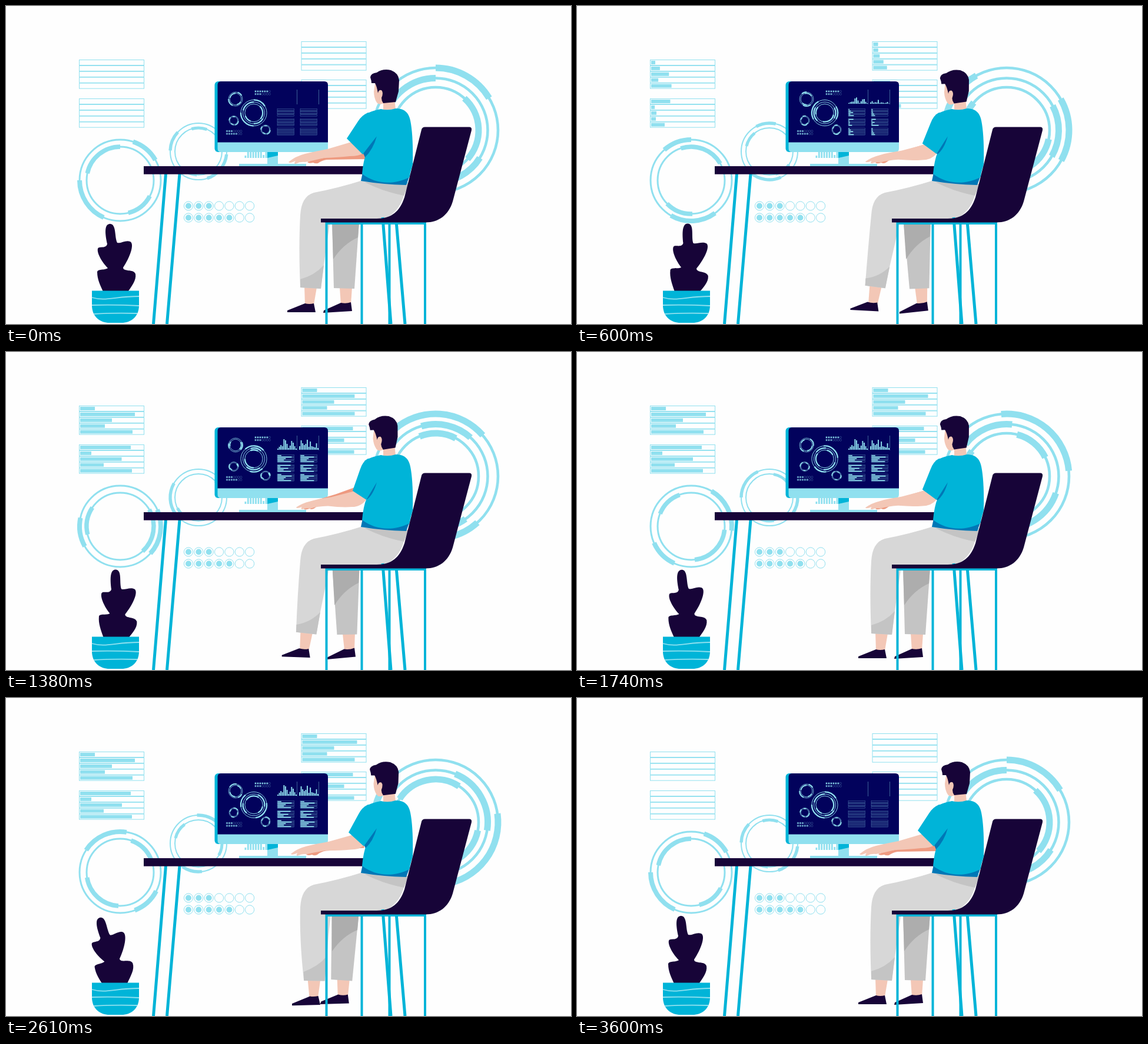
Animation, 960 px wide and 540 px high, one loop 3630 ms. Source, as an HTML page with a canvas:

```html
<!DOCTYPE html>
<html lang="en">
<head>
<meta charset="utf-8">
<title>Man at a desk</title>
<style>
html, body { margin: 0; width: 100%; height: 100%; overflow: hidden; background: #fefefe; }
canvas { display: block; }
</style>
</head>
<body>
<canvas id="stage" width="960" height="540"></canvas>
<script>
const ctx = document.getElementById('stage').getContext('2d');
const CYAN = '#00b4d8', LIGHT = '#90e0ef', DARK = '#170438', NAVY = '#02025c', BLUE = '#0077b6';
const SKIN = '#f3c7b6', SKIN_DARK = '#ee9a80', PANTS = '#d7d7d7', SHADE = '#c4c4c4', DEEP = '#adadad';
const LOOP = 3630, CYCLE = 3600, STEP = 30;
const clamp = v => Math.max(0, Math.min(1, v));

const fill = (path, color) => { ctx.fillStyle = color; ctx.fill(new Path2D(path)); };
const line = (path, color, width) => {
  ctx.strokeStyle = color; ctx.lineWidth = width; ctx.stroke(new Path2D(path));
};
const box = (x, y, w, h, color) => { ctx.fillStyle = color; ctx.fillRect(x, y, w, h); };
function placed(x, y, scale, draw) {
  ctx.save(); ctx.translate(x, y); ctx.scale(scale, scale); draw(); ctx.restore();
}
function turned(x, y, degrees, draw) {
  ctx.save(); ctx.translate(x, y); ctx.rotate(degrees * Math.PI / 180); ctx.translate(-x, -y);
  draw(); ctx.restore();
}

// Blend two paths that share the same commands.
function mix(a, b, p) {
  const to = b.match(/-?[\d.]+/g);
  let i = 0;
  return a.replace(/-?[\d.]+/g, n => (+n + (to[i++] - n) * p).toFixed(2) + ' ');
}

// Smooth periodic curve through the pose values.
const KEYS = [0, 600, 1050, 1740, 2610, 3090];
function pose(values, t) {
  t %= CYCLE;
  const n = KEYS.length;
  const time = i => KEYS[(i + n) % n] + Math.floor(i / n) * CYCLE;
  const value = i => values[(i + n) % n];
  const slope = i => (value(i + 1) - value(i - 1)) / (time(i + 1) - time(i - 1));
  let i = 0;
  while (time(i + 1) <= t) i++;
  const d = time(i + 1) - time(i), u = (t - time(i)) / d, v = 1 - u;
  return v * v * (1 + 2 * u) * value(i) + u * u * (3 - 2 * u) * value(i + 1)
    + d * u * v * (v * slope(i) - u * slope(i + 1));
}

// Each ring: radius, thin width, thick width, direction, then start and length of two arcs.
const BIG = [[106, 4.6, 11, 1, -90, 59, 91, 90], [88.5, 4.6, 11, -1, 32, 58, 193, 77], [73, 4.6, 11, 1, -48, 90, 110, 50]];
const LEFT = [[69, 3, 8, -1, -71.5, 41.5, 114, 66], [57, 3, 7.5, 1, 192, 78, 28, 48]];
const MID = [[48, 2, 5.4, 1, 182, 41, 6, 66], [40, 2, 5, -1, -107, 38, 94, 41]];
function rings(x, y, set, t, scale = 1, bold = 1) {
  placed(x, y, scale, () => {
    ctx.strokeStyle = LIGHT;
    const arc = (r, from, length, width) => {
      ctx.lineWidth = width * bold;
      ctx.beginPath();
      ctx.arc(0, 0, r, from * Math.PI / 180, (from + length) * Math.PI / 180);
      ctx.stroke();
    };
    for (const [r, thin, thick, dir, a, la, b, lb] of set) {
      const turn = dir * t / CYCLE * 360;
      arc(r, 0, 360, thin);
      arc(r, a + turn, la, thick);
      arc(r, b + turn, lb, thick);
    }
  });
}

const grow = (t, start) => clamp((t - start) / 900);
const fade = t => clamp((CYCLE - t) / 600);
const ROWS_A = [25, 93, 54, 42, 89], ROWS_B = [86, 19, 71, 40, 88];
const DELAY_A = [348, 456, 96, 340, 250], DELAY_B = [260, 310, 486, 420, 365];
const DELAY_C = [310, 520, 420, 230, 365], DELAY_D = [303, 310, 340, 420, 120];
function panel(x, y, rows, delays, t, scale = 1) {
  placed(x, y, scale, () => {
    ctx.strokeStyle = LIGHT;
    ctx.lineWidth = 1;
    rows.forEach((w, i) => {
      ctx.strokeRect(0, i * 9.9, 110, 9);
      ctx.globalAlpha = fade(t);
      box(1.5, i * 9.9 + 1.5, w * grow(t, delays[i]), 6, LIGHT);
      ctx.globalAlpha = 1;
    });
  });
}

function dots(x, y, filled, scale = 1) {
  placed(x, y, scale, () => {
    ctx.strokeStyle = ctx.fillStyle = LIGHT;
    ctx.lineWidth = 1;
    const disc = (cx, cy, r) => { ctx.beginPath(); ctx.arc(cx, cy, r, 0, 7); };
    filled.forEach((count, row) => {
      for (let i = 0; i < 7; i++) {
        disc(i * 17.35, row * 20, 7.6); ctx.stroke();
        if (i < count) { disc(i * 17.35, row * 20, 5); ctx.fill(); }
      }
    });
  });
}

function chart(x, heights, start, t) {
  box(x + 33, 142, .8, 25, '#4a78a4');
  ctx.globalAlpha = fade(t);
  heights.forEach((h, i) => {
    h *= grow(t, start + i * 7 % 5 * 50);
    box(x + i * 2.6, 166 - h, 1.9, h, LIGHT);
  });
  ctx.globalAlpha = 1;
}

function monitor(t) {
  [4, 10, 10, 10, 10, 10, 10, 5, 12].forEach((h, i) => box(405.5 + i * 4.4, 258 - h, 2.8, h, LIGHT));
  box(396, 268, 114, 4, LIGHT);
  box(444, 248, 18, 22, LIGHT);
  fill('M444 248H462V254L444 258Z', CYAN);
  ctx.fillStyle = CYAN;
  ctx.beginPath(); ctx.roundRect(354.5, 128, 180, 120, 6); ctx.fill();
  fill('M365 128H541Q547 128 547 134V232H359.5V134Q359.5 128 365 128Z', NAVY);
  fill('M359.5 231.5H547V242Q547 248 541 248H365Q359.5 248 359.5 242Z', LIGHT);

  rings(421, 181.5, BIG, t, .208);
  rings(390, 158, LEFT, t, .172, 1.5);
  rings(387, 194.5, MID, t, .165, 2);
  rings(441, 210, MID, t, .165, 2);
  dots(424, 145, [6, 3], .228);
  dots(375.5, 212.5, [3, 5], .228);
  chart(461, [2, 5, 8, 6, 18, 16, 10, 3, 7, 15, 12, 6, 2], 0, t);
  chart(498, [6, 16, 11, 8, 10, 17, 5, 14, 6, 5, 4, 11, 3], 250, t);
  for (const [x, a, b] of [[461, DELAY_A, DELAY_B], [500, DELAY_C, DELAY_D]]) {
    panel(x, 174.7, ROWS_A, a, t, .258);
    panel(x, 191.3, ROWS_B, b, t, .258);
    panel(x, 207, ROWS_A, a, t, .258);
  }
}

function plant(t) {
  turned(187, 484, pose([0, 6, 8, .6, -8.5, -5.5], t), () => fill(
    'M166 487C160 474 155 464 155 452C155 446 168 449 173 445C164 436 154 420 156 412C158 407 170 413 172 404' +
    'C169 390 166 371 176 370C188 369 184 392 189 402C194 404 203 397 211 400C219 404 210 428 199 444' +
    'C199 452 217 446 220 455C222 466 213 476 206 487Z', DARK));
  fill('M146 483.5H226V508C226 528 212 538 196 538H176C160 538 146 528 146 508Z', CYAN);
  line('M146 495C170 502 185 493 226 493M146 508Q186 507 226 509M149 523Q180 521 223 522', LIGHT, 1.8);
}

function legs(t) {
  const q = pose([0, .8, 1, 0, -.47, -.24], t);
  const part = (a, b, color) => fill(mix(a, b, q), color);
  part('M567 478L588 478L586 506L569 507Z', 'M576 478L597 478L597 504L580 505Z', SKIN);
  part('M539 521L540 517L569 504Q578 506 586 503L588 518Z', 'M550 523L550 520L579 505Q588 506 597 502L599 517Z', DARK);
  part('M554 366L600 366L592 480L557 479Z', 'M555 366L601 366L600 479L567 481Z', SHADE);
  part('M554 366L600 366L598 393Q573 404 556 430Z', 'M555 366L601 366L600 391Q575 404 560 430Z', DEEP);
  part('M507 476L528 478L523 507L508 507Z', 'M495 473L515 476L508 504L492 503Z', SKIN);
  part('M478 520L478 517L508 505Q515 507 523 505L526 520Z', 'M461 515L461 513L490 502Q500 505 507 503L509 518Z', DARK);
  part('M606 296L684 302L676 322Q668 350 640 364L551 364Q545 402 540 440L535 480L500 478Q497 410 500 355Q502 323 523 317Q565 309 606 296Z',
    'M606 296L684 302L676 322Q668 350 640 364L548 364Q540 402 529 443L521 479L487 474Q494 410 500 355Q502 323 523 317Q565 309 606 296Z', PANTS);
  part('M500 464Q525 457 540 440L535 480L500 478Z', 'M488 462Q512 460 529 443L521 479L487 474Z', SHADE);
  fill('M609 299L684 302L676 322Q640 315 609 299Z', SHADE);
}

function upperBody(t) {
  const p = pose([0, .71, 1, .71, .28, .1], t);
  const part = (a, b, color) => fill(mix(a, b, p), color);
  part('M612 247L570 252L540 258Q525 259 512 265Q514 268 522 266Q525 268 530 267Q537 262 545 261L612 260Z',
    'M596 226L560 240L535 248Q522 252 505 266Q507 269 515 266Q520 269 525 264Q533 257 540 256L600 240Z', SKIN_DARK);
  fill('M641 156H660L662 176Q650 180 641 176Z', SKIN);
  fill('M606 283Q640 295 686 288L680 304Q640 303 603 297Z', BLUE);
  fill('M637 175Q650 178 662 174C680 174 686 184 688 200Q692 225 691 268L685 291C660 304 628 303 605 285Q607 262 613 248L609 185Q620 178 637 175Z', CYAN);
  part('M630 221L606 248L610 257Q624 243 630 221Z', 'M630 221L612 249L613 250Q624 243 630 221Z', BLUE);
  part('M590 230L546 243Q525 247 508 251Q492 255 480 265Q482 268 492 263Q488 268 492 268Q500 264 508 265Q520 263 540 258Q565 257 584 255Q600 255 607 250Z',
    'M592 237L553 247Q530 250 517 254Q504 257 494 264Q496 266 504 263Q501 267 505 267Q512 264 518 266Q530 262 548 262Q570 265 588 264Q604 264 613 250Z', SKIN);
  part('M615 181Q604 186 598 196L579 225L606 252L630 221L636 185Z',
    'M615 181Q606 186 602 200L590 237L613 251L630 221L636 185Z', CYAN);
  turned(652, 170, -3.7 * p, () => {
    fill('M628 126L625 145Q625 156 630 164Q634 169 642 165L646 138Z', SKIN);
    fill('M619 121Q620 114 630 113Q640 106 654 109Q667 114 668 126L667 145L662 163L641 165Q638 161 638 156' +
      'Q642 147 638 143Q633 142 632 148Q630 136 627 131L621 131Q621 127 619 121Z', DARK);
  });
}

function chair() {
  line('M640 359L654 540M663 365L678 540', CYAN, 5);
  line('M544.5 540V369H712V540M604.5 369V540M651.5 369V540', CYAN, 4);
  fill('M712 205.5H787Q792 205.5 791 211L759 332C752 355 735 367.5 713 367.5H535V361H630C655 361 669 349 677 325L706 210Q707 205.5 712 205.5Z', DARK);
}

function draw(t) {
  box(0, 0, 960, 540, '#fefefe');
  rings(730, 211, BIG, t);
  rings(194, 296, LEFT, t);
  rings(327, 247, MID, t);
  panel(124.5, 91.5, ROWS_A, DELAY_A, t);
  panel(124.5, 157.5, ROWS_B, DELAY_B, t);
  panel(502, 60.5, ROWS_A, DELAY_C, t);
  panel(502, 125.5, ROWS_B, DELAY_D, t);
  dots(310, 339.5, [3, 5]);
  plant(t);
  line('M271.5 285L250.5 540M295 285L273.5 540', CYAN, 5);
  monitor(t);
  box(234, 272, 386, 13.7, DARK);
  legs(t);
  upperBody(t);
  chair();
}

function tick() {
  draw(Math.floor(performance.now() % LOOP / STEP) * STEP);
  requestAnimationFrame(tick);
}
tick();
</script>
</body>
</html>
```
